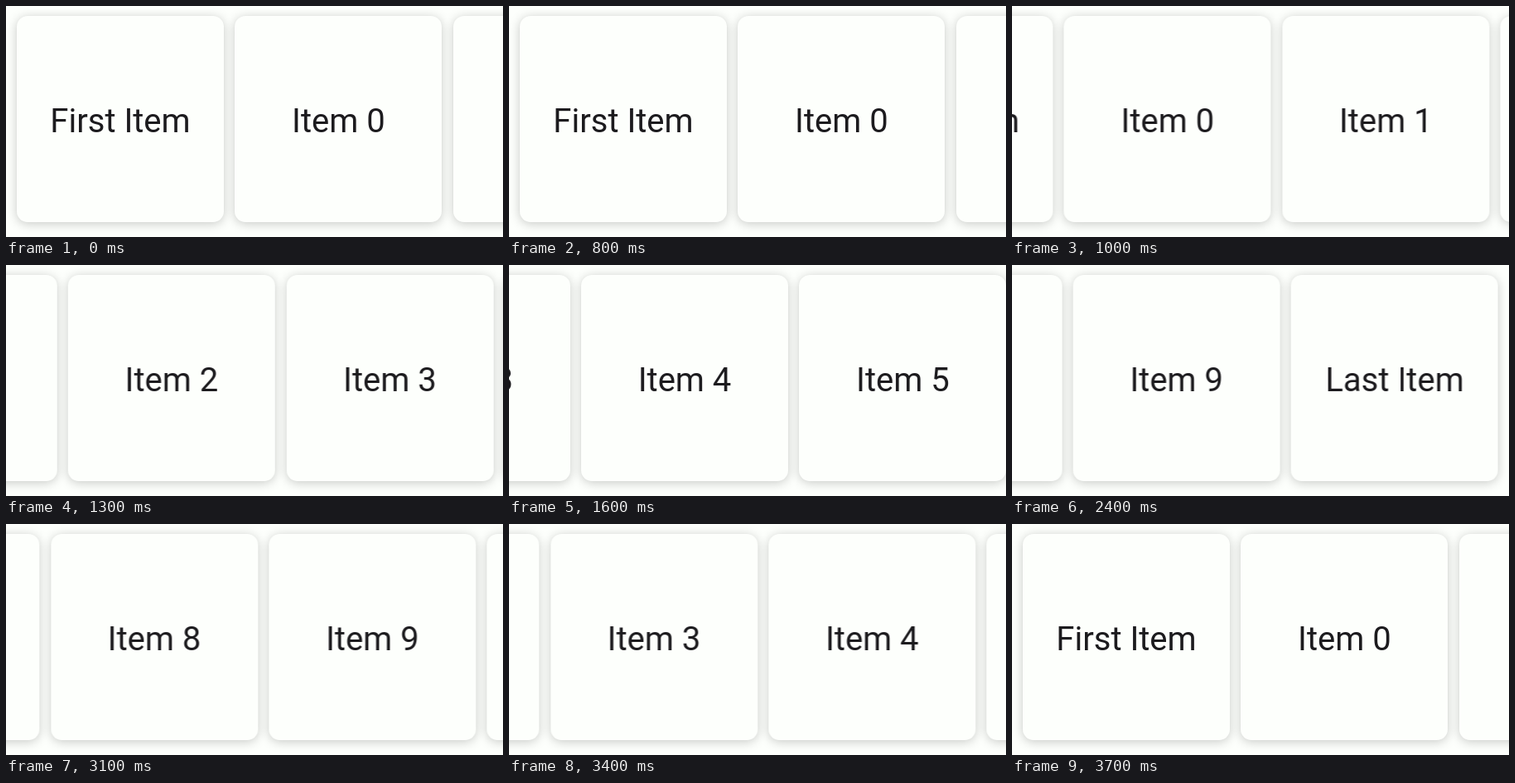
An HTML page that plays this animation: 600x280 px, repeating every 4500 ms.

```html
<!DOCTYPE html>
<html lang="en">
<head>
<meta charset="utf-8">
<style>
  html, body { margin: 0; width: 100%; height: 100%; overflow: hidden; background: #fdfffc; }
  #stage { position: relative; width: 100%; height: 100%; overflow: hidden; contain: strict; }
  #row { position: absolute; left: 0; top: 12px; will-change: transform; }
  .card {
    position: absolute; width: 250px; height: 250px; border-radius: 13px;
    background: #fdfffc; color: #1c1b1e;
    box-shadow: 0 2px 13px rgba(0, 0, 0, .21), 0 0 2px rgba(0, 0, 0, .05);
    font: 40px/256px Roboto, sans-serif; text-align: center; white-space: nowrap;
  }
</style>
</head>
<body>
<div id="stage"><div id="row"></div></div>
<script>
const LOOP = 4500, PITCH = 263.4, MARGIN = 13;
const row = document.getElementById('row');
const labels = ['First Item', ...Array.from({ length: 10 }, (_, i) => `Item ${i}`), 'Last Item'];

labels.forEach((label, i) => {
  const card = document.createElement('div');
  card.className = 'card';
  card.textContent = label;
  card.style.left = MARGIN + i * PITCH + 'px';
  row.append(card);
});

const end = MARGIN * 2 + (labels.length - 1) * PITCH + 250 - 600;
const progress = (t, from, to) => Math.min(1, Math.max(0, (t - from) / (to - from)));

// Steady scroll to the last card, then a quicker return.
function draw(now) {
  const t = now % LOOP;
  const scroll = end * (progress(t, 876.5, 2376.5) - progress(t, 3045.3, 3633.3));
  row.style.transform = `translateX(${-scroll}px)`;
  requestAnimationFrame(draw);
}
draw(performance.now());
</script>
</body>
</html>
```
